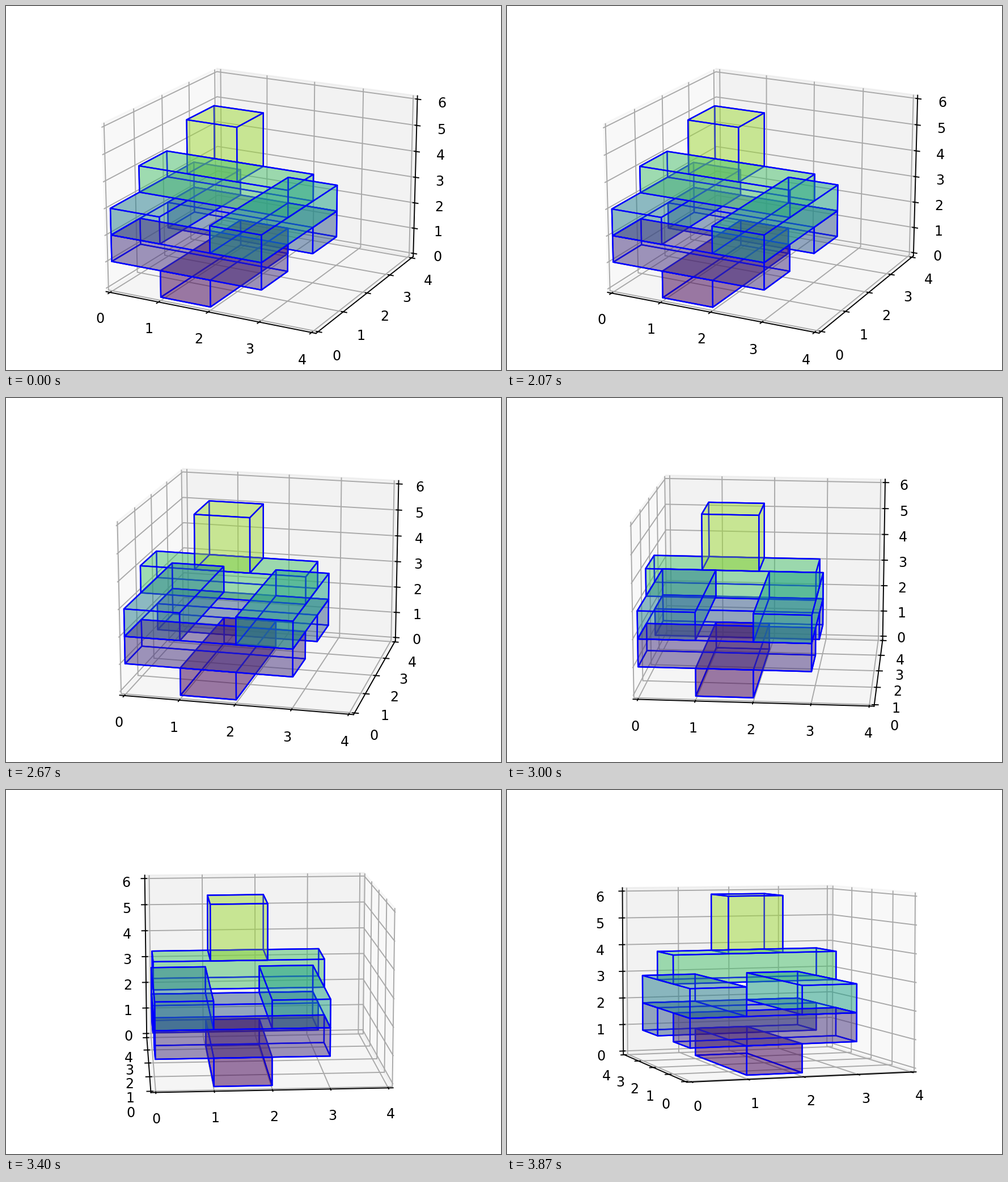
Recreate the animation shown at these times as a matplotlib script. Size 873 px wide and 642 px high, loop 6130 ms.

```python
import numpy as np
import matplotlib.pyplot as plt
from matplotlib.animation import FuncAnimation
from mpl_toolkits.mplot3d.art3d import Poly3DCollection

WIDTH, HEIGHT, DPI = 873, 642, 171
LOOP_MS, FRAMES = 6130, 92

# Square 3D viewport: its side and the on-screen centre of the cube, in pixels.
SIDE = 633
CENTER_X, CENTER_Y = 453.8, 312.6
LOW, HIGH = -0.095, 0.09

# Corner position and size of each bar.
BARS = [
    ((1, 0, 0), (1, 3, 1)),
    ((0, 0, 1), (3, 1, 1)),
    ((0, 2, 1), (3, 1, 1)),
    ((0, 0, 2), (1, 3, 1)),
    ((2, 0, 2), (1, 3, 1)),
    ((0, 1, 3), (3, 1, 1)),
    ((1, 1, 4), (1, 1, 2)),
]

# Camera path of the drag: animation step, azimuth, elevation.
STEPS = np.array([31, 36, 45, 51, 58])
AZIMUTH = np.array([-63.35, -70.25, -84.6, -94.35, -108.9])
ELEVATION = np.array([18.7, 17.75, 14.4, 11.5, 4.5])
REST_VIEW = (18.7, -62.6)


def box_faces(corner, size):
    """Return the six quads of a cuboid."""
    low, span = np.array(corner, float), np.array(size, float)
    square = [(0, 0), (1, 0), (1, 1), (0, 1)]
    faces = []
    for axis in range(3):
        for side in (0, 1):
            unit = np.array([np.insert(p, axis, side) for p in square])
            faces.append(low + unit * span)
    return faces


def smooth(x, knots, values):
    """Cubic Hermite curve through the knots."""
    slopes = np.gradient(values, knots)
    i = int(np.clip(np.searchsorted(knots, x) - 1, 0, len(knots) - 2))
    h = knots[i + 1] - knots[i]
    t = (x - knots[i]) / h
    return ((2 * t**3 - 3 * t**2 + 1) * values[i]
            + (t**3 - 2 * t**2 + t) * h * slopes[i]
            + (3 * t**2 - 2 * t**3) * values[i + 1]
            + (t**3 - t**2) * h * slopes[i + 1])


def camera(frame):
    """Return elevation and azimuth for a frame."""
    if frame < STEPS[0]:
        return REST_VIEW
    step = min(frame, STEPS[-1])
    return smooth(step, STEPS, ELEVATION), smooth(step, STEPS, AZIMUTH)


plt.rcParams["grid.color"] = "#a8a8a8"

# The small margin keeps the pixel size from being rounded down.
fig = plt.figure(figsize=((WIDTH + 0.01) / DPI, (HEIGHT + 0.01) / DPI),
                 dpi=DPI, facecolor="white")
origin = SIDE * -LOW / (HIGH - LOW)
ax = fig.add_axes([(CENTER_X - origin) / WIDTH, (CENTER_Y - origin) / HEIGHT,
                   SIDE / WIDTH, SIDE / HEIGHT], projection="3d")
ax.viewLim.intervalx = (LOW, HIGH)
ax.viewLim.intervaly = (LOW, HIGH)

for i, (corner, size) in enumerate(BARS):
    color = plt.cm.viridis(i / len(BARS), alpha=0.3)
    ax.add_collection3d(Poly3DCollection(
        box_faces(corner, size), facecolors=[color] * 6,
        edgecolors="b", linewidths=1))

ax.set_xlim(0, 4, view_margin=1 / 48)
ax.set_ylim(0, 4, view_margin=1 / 48)
ax.set_zlim(0, 6, view_margin=1 / 48)
ax.set_xticks(range(5))
ax.set_yticks(range(5))
ax.set_zticks(range(7))


def update(frame):
    elevation, azimuth = camera(frame)
    ax.view_init(elev=elevation, azim=azimuth)
    return []


anim = FuncAnimation(fig, update, frames=FRAMES, interval=LOOP_MS / FRAMES,
                     repeat=True, repeat_delay=0, blit=False)
plt.show()
```
